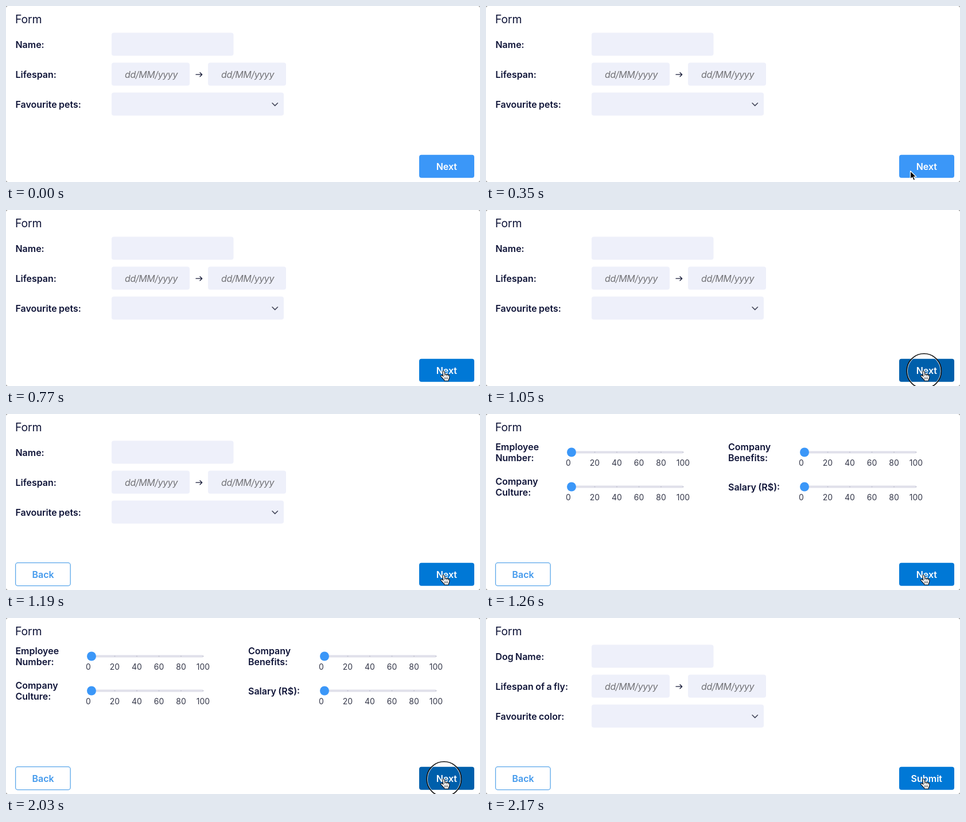
Animation of 826x306 px, one loop 2.52 s. Source, as an HTML page:

```html
<!DOCTYPE html>
<html lang="en">
<head>
<meta charset="utf-8">
<title>Form wizard</title>
<style>
html, body { margin: 0; width: 100%; height: 100%; overflow: hidden; background: #8b8b8b; }
svg { display: block; width: 826px; height: 306px; font-family: Inter, "Open Sans", sans-serif; }
text { fill: #0f1438; white-space: pre; }
.title { font-size: 19.5px; letter-spacing: -.2px; }
.label { font-size: 16px; font-weight: 600; word-spacing: -.7px; }
.hint { font-size: 16px; font-style: italic; letter-spacing: -.4px; fill: #727276; text-anchor: middle; }
.num { font-size: 14px; fill: #35384a; text-anchor: middle; }
.btn { font-size: 16px; font-weight: 600; text-anchor: middle; }
.field { fill: #eef0fa; }
.line { fill: none; stroke-linecap: round; stroke-linejoin: round; }
</style>
</head>
<body>
<svg id="stage" viewBox="0 0 826 306"></svg>
<script>
const BLUE = '#3b97f8', HOVER = '#0078d6', PRESSED = '#005fab';
const LOOP = 2520, STEP = 70;
const stage = document.getElementById('stage');

const text = (x, y, s, cls) => `<text x="${x}" y="${y}" class="${cls}">${s}</text>`;
const box = (x, y, w, attrs) => `<rect x="${x}" y="${y}" width="${w}" height="40" rx="4" ${attrs}/>`;
const field = (x, y, w) => box(x, y, w, 'class="field"');
const group = (id, body) => `<g id="${id}">${body}</g>`;

function fieldPage(id, labels) {
  const rows = labels.map((s, i) => text(16.4, 72.6 + 52 * i, s, 'label')).join('');
  return group(id, rows +
    field(184, 46.5, 212.5) + field(184, 98.5, 136) + field(352, 98.5, 136) + field(184, 150.5, 300) +
    text(253, 124.6, 'dd/MM/yyyy', 'hint') + text(421, 124.6, 'dd/MM/yyyy', 'hint') +
    '<path class="line" d="M331 119.2H341.5M338 115.7L341.7 119.2L338 122.7" stroke="#191d3a" stroke-width="1.3"/>' +
    '<path class="line" d="M464 168.8L468.7 173.4L473.4 168.8" stroke="#44475a" stroke-width="1.6"/>');
}

function slider(x, y) {
  let s = `<rect x="${x}" y="${y - 2}" width="195" height="4" rx="2" fill="#e0e0ea"/>`;
  for (let i = 0; i < 6; i++) {
    const tx = x + 2 + 38.5 * i;
    if (i) s += `<circle cx="${tx}" cy="${y}" r="1" fill="#c3c4d2"/>`;
    s += text(i ? tx : x - 5.5, y + 23.6, 20 * i, 'num');
  }
  return s + `<circle cx="${x}" cy="${y}" r="8" fill="${BLUE}"/>`;
}

const sliderPage = group('sliders',
  text(16.4, 63, 'Employee', 'label') + text(16.4, 82, 'Number:', 'label') +
  text(16.4, 123, 'Company', 'label') + text(16.4, 142, 'Culture:', 'label') +
  text(422, 63, 'Company', 'label') + text(422, 82, 'Benefits:', 'label') +
  text(422, 132.6, 'Salary (R$):', 'label') +
  [149, 555].map(x => slider(x, 66.5) + slider(x, 126.5)).join(''));

// Pointer shapes are drawn with their hot spot at 0,0
const arrow = group('arrow',
  '<path d="M0 0V14.2L3.3 11.1L5.6 16.4L8.2 15.3L5.9 10.2H10.4Z" fill="#000" stroke="#fff" stroke-width="1.2" stroke-linejoin="round"/>');
const hand = group('hand',
  '<path d="M-1.7 .8C-1.7 -1.2 1.2 -1.4 1.5 .6L2.3 5.2C3 4.3 4.7 4.4 5.1 5.6C6 4.9 7.5 5.2 7.9 6.4' +
  'C9 5.9 10.3 6.5 10.3 8V10.5C10.3 12.3 9.2 13.4 8.7 14.6V16.4H1.3V15C-.6 13.2 -2.4 11.1 -4.4 9' +
  'C-5.6 7.5 -3.7 6 -2.1 7.3L-.5 8.7Z" fill="#fff" stroke="#111" stroke-width="1.1" stroke-linejoin="round"/>' +
  '<path class="line" d="M2.3 5.2V7.8M5.1 5.7V8M7.9 6.5V8.4M2.2 10.5V13.4M4.5 10.5V13.4M6.8 10.5V13.4" stroke="#222" stroke-width=".9"/>');
const ring = group('ring',
  '<circle cx="763.3" cy="280" r="29" fill="none" stroke="#fff" stroke-width="1.2" opacity=".75"/>' +
  '<circle cx="763.3" cy="280" r="30.2" fill="none" stroke="#111" stroke-width="1.6"/>');

stage.innerHTML =
  '<rect width="826" height="306" rx="4" fill="#fff"/>' +
  text(16, 29.8, 'Form', 'title') +
  fieldPage('first', ['Name:', 'Lifespan:', 'Favourite pets:']) +
  sliderPage +
  fieldPage('last', ['Dog Name:', 'Lifespan of a fly:', 'Favourite color:']) +
  group('back', box(16.6, 258.7, 95.6, 'fill="#fff" stroke="#5ba7ea" stroke-width="1.3"') +
    '<text x="64.5" y="284.6" class="btn" style="fill:#4299ec">Back</text>') +
  box(720, 258.7, 96, 'id="next"') +
  '<text id="caption" x="767.8" y="284.6" class="btn" style="fill:#fff"></text>' +
  ring + arrow + hand;

const el = id => document.getElementById(id);
const show = (id, on) => el(id).setAttribute('display', on ? 'inline' : 'none');

// time, x, y of the pointer
const path = [
  [70, 767, 295], [140, 730, 278], [350, 739.5, 286.8], [420, 728, 284],
  [490, 718, 281], [560, 737, 281], [630, 752, 281], [700, 760, 281], [770, 762.5, 280.6]
];

function nextColor(t) {
  if (t < 560) return BLUE;
  if (t < 630) return '#1e88e8';
  const down = t >= 1050 && t < 1190 || t >= 1960 && t < 2100;
  return down ? PRESSED : HOVER;
}

function draw(time) {
  const t = Math.floor(time % LOOP / STEP) * STEP;
  show('first', t < 1260);
  show('sliders', t >= 1260 && t < 2170);
  show('last', t >= 2170);
  show('back', t >= 1190);

  const color = nextColor(t);
  el('next').setAttribute('fill', color);
  el('caption').textContent = t < 2100 ? 'Next' : 'Submit';
  show('ring', color === PRESSED);

  const spot = path.filter(p => p[0] <= t).pop();
  const over = t >= 560;
  show('arrow', spot && !over);
  show('hand', over);
  if (spot) el(over ? 'hand' : 'arrow').setAttribute('transform', `translate(${spot[1]} ${spot[2]})`);
}

const start = performance.now();
function tick() {
  draw(performance.now() - start);
  requestAnimationFrame(tick);
}
tick();
</script>
</body>
</html>
```
